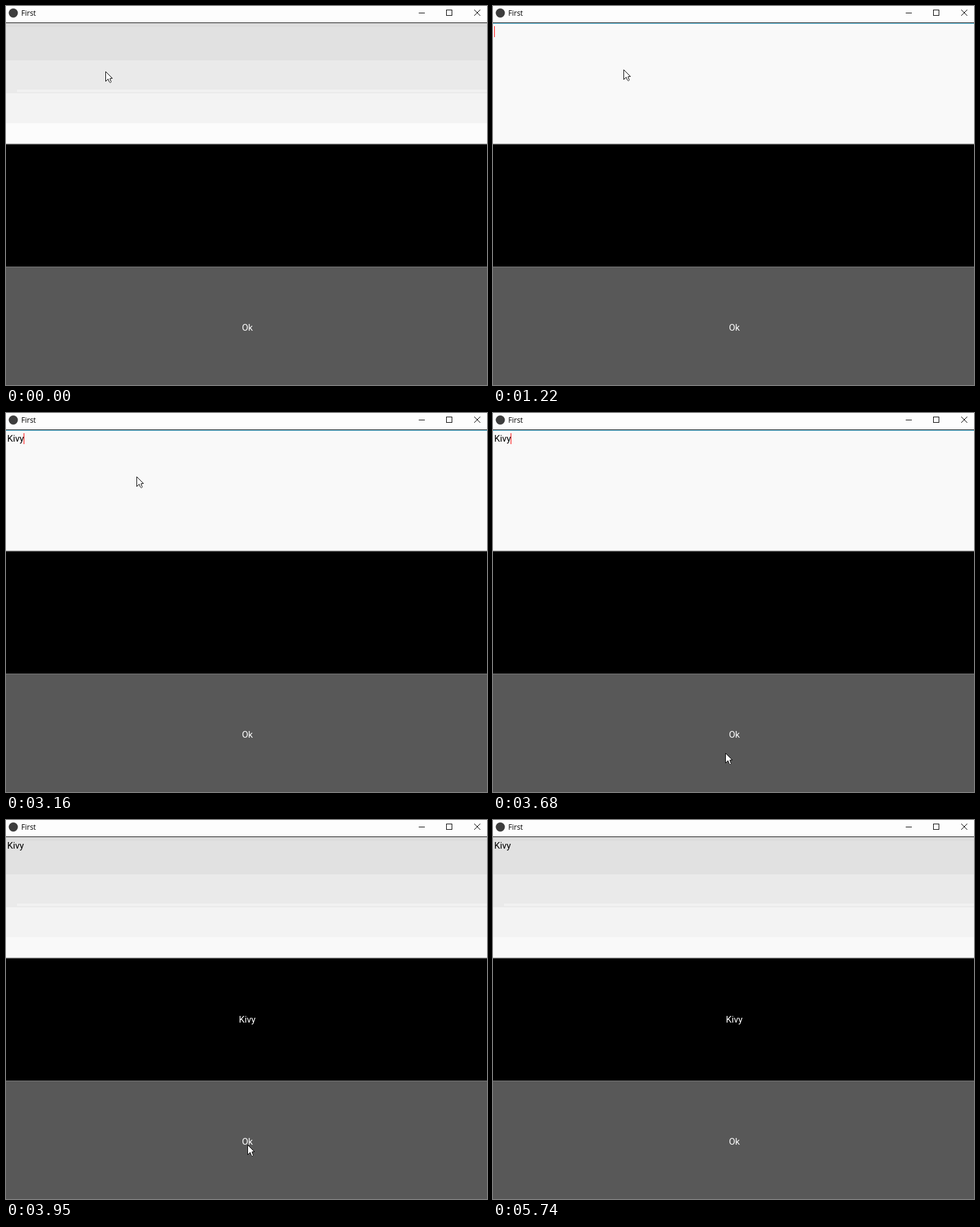
An HTML page with a canvas that plays this animation: 789x621 px, repeating every 6.8 s.

```html
<!DOCTYPE html>
<html lang="en">
<head>
<meta charset="utf-8">
<title>First</title>
<style>
  html, body { margin: 0; height: 100%; overflow: hidden; background: #000; }
  canvas { display: block; }
</style>
</head>
<body>
<canvas width="789" height="621"></canvas>
<script>
const ctx = document.querySelector('canvas').getContext('2d');
const W = 789, H = 621, LOOP = 6800;
const FOCUS = 1220, PRESS = 3800, RELEASE = 3950, LEAVE = 5740;
const WORD = 'Kivy', keyTimes = [2180, 2300, 2450, 2700];

// Pointer path: time, x, y, number of even jumps to the next point
const path = [
  [0, 163, 107], [280, 235, 92], [560, 235, 92, 4], [1100, 214, 104],
  [3530, 370, 598], [3680, 381, 557], [PRESS, 396, 532], [4510, 389, 534],
  [4930, 364, 480, 2], [5170, 697, 281], [5320, 701, 420], [5470, 767, 540],
  [5590, 763, 616]
];

function pointerAt(t) {
  const i = path.findLastIndex(p => t >= p[0]);
  const [t0, x0, y0, jumps = 1] = path[i];
  const [t1, x1, y1] = path[i + 1] || [LOOP, x0, y0];
  const f = Math.floor((t - t0) / (t1 - t0) * jumps) / jumps;
  return [Math.round(x0 + (x1 - x0) * f), Math.round(y0 + (y1 - y0) * f)];
}

function rect(x, y, w, h, color) {
  ctx.fillStyle = color;
  ctx.fillRect(x, y, w, h);
}

function text(s, x, y, color, font = '15px Roboto, sans-serif') {
  ctx.font = font;
  ctx.fillStyle = color;
  ctx.fillText(s, x, y);
  return Math.round(x + ctx.measureText(s).width);
}

function titleBar() {
  rect(0, 0, W, 27, '#fdfdfd');
  ctx.fillStyle = '#3d3d3d';
  ctx.beginPath();
  ctx.arc(12, 11.5, 7.5, 0, 7);
  ctx.fill();
  text('First', 25, 16, '#000', '12px "Open Sans", sans-serif');

  rect(677, 11, 10, 1, '#000');
  ctx.strokeStyle = '#000';
  ctx.strokeRect(722.5, 6.5, 9, 9);
  ctx.beginPath();
  for (const side of [-5, 5]) {
    ctx.moveTo(773 + side, 6);
    ctx.lineTo(773 - side, 16);
  }
  ctx.stroke();
}

function inputBox(focused, submitted) {
  rect(0, 27, W, 1, '#111');
  if (focused) {
    rect(0, 28, W, 197, '#f9f9f9');
    rect(0, 28, W, 1, '#5cbfe0');
    rect(0, 29, W, 1, '#d5eef6');
  } else {
    rect(0, 28, W, 6, '#dcdcdc');
    [34, 89, 143, 192].forEach((y, i) => {
      const level = Math.min(225 + 9 * i, submitted ? 249 : 253);
      rect(0, y, W, 225 - y, `rgb(${level} ${level} ${level})`);
    });
    rect(18, 137, W, 4, '#f1f1f1');
  }
  rect(0, 225, W, 1, '#c8c8c8');
  rect(0, 226, W, 1, '#707070');
}

function typing(t, focused) {
  const pressed = keyTimes.filter(k => t >= k);
  const end = text(WORD.slice(0, pressed.length), 2, 47, '#000');
  const idle = t - (pressed.at(-1) ?? FOCUS);
  if (focused && idle % 980 < 490) rect(end, 33, 1, 18, '#f00');
}

function button(down) {
  rect(0, 427, W, H - 427, down ? '#32a4ce' : '#585858');
  rect(0, 427, W, 1, down ? '#5fb6d9' : '#7d7d7d');
  text('Ok', 387, 532, '#fff');
}

function arrow(x, y) {
  ctx.save();
  ctx.translate(x + .5, y + .5);
  ctx.fillStyle = '#fff';
  ctx.strokeStyle = '#000';
  const shape = new Path2D('M0 0V16L4 12 6 17 7 18H8L9 17 7 11.3 11 11Z');
  ctx.fill(shape);
  ctx.stroke(shape);
  ctx.restore();
}

function draw(t) {
  const focused = t >= FOCUS && t < RELEASE;
  const submitted = t >= PRESS;
  rect(0, 0, W, H, '#000');
  titleBar();
  inputBox(focused, submitted);
  typing(t, focused);
  if (submitted) text(WORD, 382, 332, '#fff');
  button(submitted && focused);
  if (t < LEAVE) arrow(...pointerAt(t));
}

const start = performance.now();
function tick() {
  draw((performance.now() - start) % LOOP);
  requestAnimationFrame(tick);
}
tick();
</script>
</body>
</html>
```
